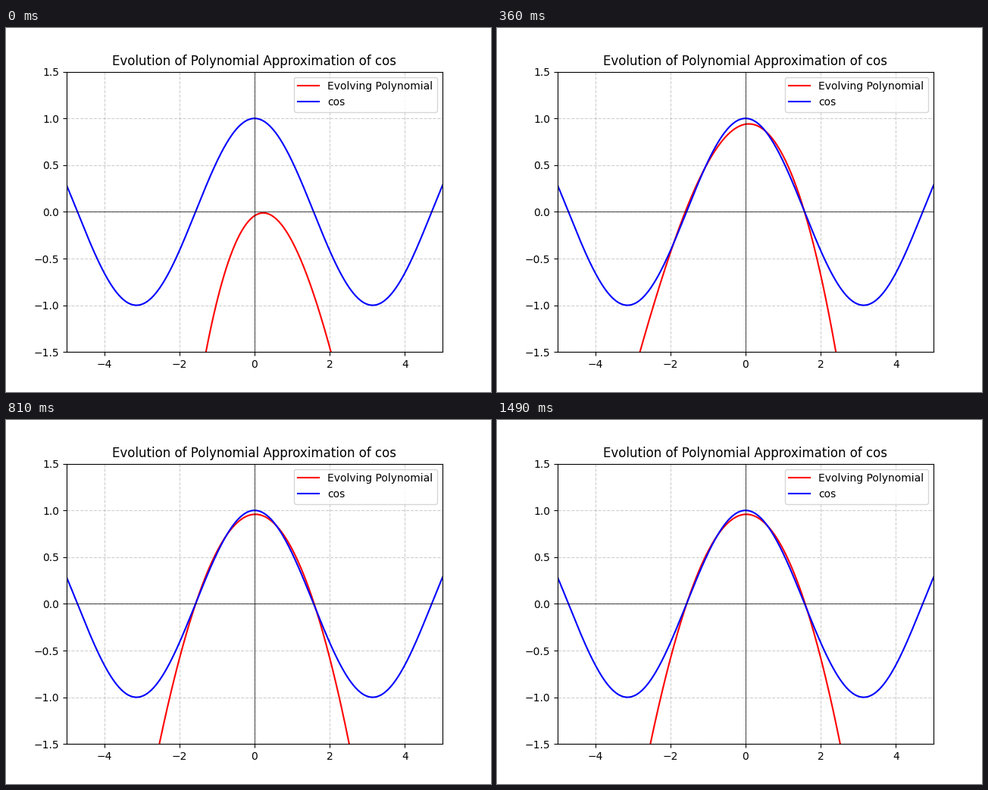
Write a matplotlib script that moves like this. It is 640 by 480 pixels and loops after 1520 ms.

```python
import numpy as np
import matplotlib.pyplot as plt
from matplotlib.animation import FuncAnimation

LOOP_MS = 1520
TICK_MS = 10
STEP_MS = 30
TURN_STEP = 7

# Cubic coefficients, constant term first
START = np.array([-0.042, 0.265, -0.595, 0.055])
TURN = np.array([0.650, 0.167, -0.105, -0.104])
END = np.array([0.958, 0.015, -0.3855, -0.0033])
SETTLE = np.array([2.4, 4.7, 2.15, 4.2])  # settling time in steps


def coefs_at(step):
    """Steady climb to the turning pose, then a decay into the final fit."""
    if step < TURN_STEP:
        return START + (TURN - START) * step / TURN_STEP
    decay = np.exp(-((step - TURN_STEP) / SETTLE) ** 1.37)
    return END + (TURN - END) * decay


def curve(step):
    return np.polynomial.polynomial.polyval(x, coefs_at(step))


plt.rcParams["font.family"] = "DejaVu Sans"
fig, ax = plt.subplots(figsize=(6.4, 4.8), dpi=100)
x = np.linspace(-5, 5, 500)

poly, = ax.plot(x, curve(0), color="red", label="Evolving Polynomial")
ax.plot(x, np.cos(x), color="blue", label="cos")
ax.set_xlim(-5, 5)
ax.set_ylim(-1.5, 1.5)
ax.set_title("Evolution of Polynomial Approximation of cos")
ax.axhline(0, color="black", linewidth=0.5)
ax.axvline(0, color="black", linewidth=0.5)
ax.grid(True, linestyle="--", alpha=0.6)
ax.legend(loc="upper right")


def update(frame):
    poly.set_ydata(curve(frame * TICK_MS // STEP_MS))
    return poly,


anim = FuncAnimation(fig, update, frames=LOOP_MS // TICK_MS,
                     interval=TICK_MS, repeat=True, repeat_delay=0)
plt.show()
```
